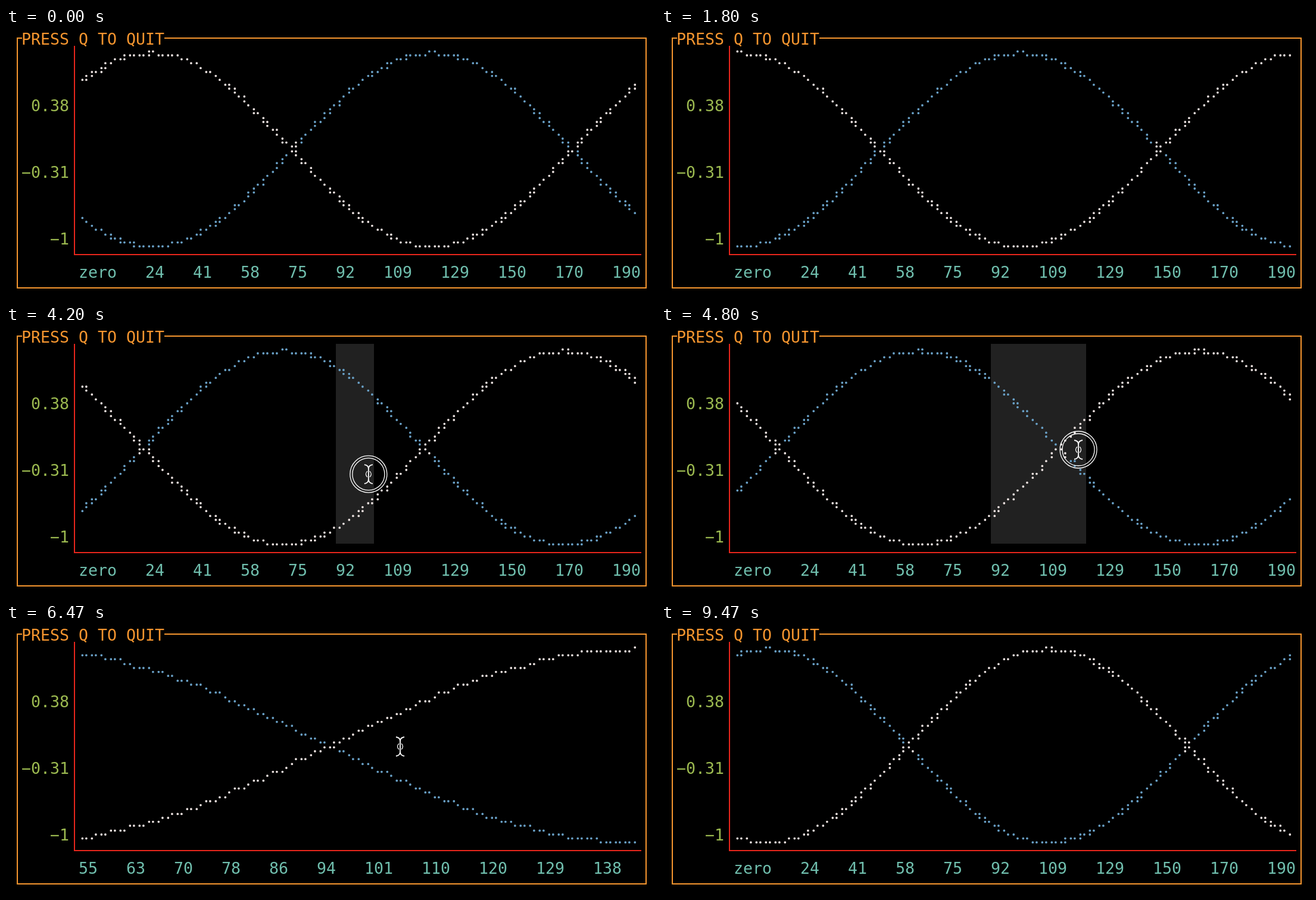
Recreate the animation shown at these times as an HTML page. Size 1090 px wide and 454 px high, loop 9.54 s.

```html
<!DOCTYPE html>
<html lang="en">
<head>
<meta charset="utf-8">
<title>Line chart</title>
<style>
html, body { margin: 0; width: 100%; height: 100%; overflow: hidden; background: #000; }
svg { display: block; width: 1090px; height: 454px; }
text { font: 26.58px "DejaVu Sans Mono", monospace; white-space: pre; }
path, circle { fill: none; }
.dots { stroke-width: 3.8; stroke-linecap: round; }
</style>
</head>
<body>
<svg viewBox="0 0 1090 454">
  <rect width="1090" height="454"/>
  <path d="M27 17H19V437H1075V17H266" stroke="#f7962f" stroke-width="2"/>
  <text x="26" y="28" fill="#f7962f">PRESS Q TO QUIT</text>
  <rect id="selection" y="30" height="336" fill="#212121"/>
  <path d="M115 30V381H1067" stroke="#e8261c" stroke-width="2"/>
  <g fill="#9cba50" text-anchor="end">
    <text x="106" y="140">0.38</text>
    <text x="106" y="252">−0.31</text>
    <text x="106" y="364">−1</text>
  </g>
  <g id="labels" fill="#70bfae"></g>
  <path id="blue" class="dots" stroke="#69a0c6"/>
  <path id="white" class="dots" stroke="#e8dfdd"/>
  <g id="cursor" stroke="#fff">
    <g id="rings" stroke-width="1.3"><circle r="31"/><circle r="27"/></g>
    <path d="M-7 -16Q0 -15 0 -9V9Q0 15 -7 16M7 -16Q0 -15 0 -9M0 9Q0 15 7 16" stroke-width="1.8"/>
    <path d="M-2 -5Q-7 0 -2 5M2 -5Q7 0 2 5" stroke-width="1.2"/>
  </g>
</svg>
<script>
const LOOP = 9540, LEFT = 122, CELL_W = 16, CELL_H = 28, CELLS = 59, ROWS = 48;
const FIRST_TICK = 25, TICK = 250, STEP = TICK / 3;
const PRESS = 3900, RELEASE = 5000;
const $ = id => document.getElementById(id);

// time, x, y of the pointer
const POINTER = [
  [2900, 590, 474], [3070, 585, 440], [3470, 565, 282], [3900, 562, 270],
  [4800, 701, 208], [5000, 703, 208], [6470, 662, 206], [7670, 648, 232],
  [7800, 650, 260], [8000, 662, 410], [8100, 668, 474]
];
// time, first and last visible value
const ZOOM = [
  [0, 0, 199], [RELEASE, 92, 124], [6130, 80, 131], [6270, 67, 138],
  [6420, 55, 145], [6600, 36, 162], [6800, 18, 180], [7000, 0, 199]
];

function pointerAt(t) {
  const n = POINTER.findIndex(p => p[0] > t);
  if (n < 1) return null;
  const [t0, x0, y0] = POINTER[n - 1], [t1, x1, y1] = POINTER[n];
  const k = (t - t0) / (t1 - t0);
  return [x0 + (x1 - x0) * k, y0 + (y1 - y0) * k];
}

// The chart redraws on a slow tick, and at once while the mouse is in use.
function shiftAt(t) {
  const busy = t > PRESS && t < RELEASE || t > 6130 && t < 7050;
  const since = t - FIRST_TICK;
  return busy
    ? 128 + Math.floor(since / STEP + 0.3)
    : 128 + 3 * Math.floor(since / TICK);
}

function plot(cells, shift, min, max, step, isWhite) {
  const col = i => Math.round((i - min) / step);
  const row = i => ROWS - 1 - Math.round((Math.sin((i + shift) * Math.PI / 100) + 1) / 0.043);
  const set = (c, r) => {
    const key = (c >> 1) + CELLS * (r >> 2);
    if (!cells.has(key)) cells.set(key, { dots: new Set() });
    const cell = cells.get(key);
    cell.white = isWhite;
    cell.dots.add((c & 1) + 2 * (r & 3));
  };
  for (let i = min + 1; i < max; i++) {
    const c0 = col(i - 1), c1 = col(i), r0 = row(i - 1), r1 = row(i);
    set(c0, r0);
    for (let c = c0 + 1; c < c1; c++) set(c, Math.round(r0 + (r1 - r0) * (c - c0) / (c1 - c0)));
    set(c1, r1);
  }
}

function drawCurves(shift, min, max, step) {
  const cells = new Map();
  plot(cells, shift, min, max, step, false);
  plot(cells, shift + 100, min, max, step, true);
  let blue = "", white = "";
  for (const [key, cell] of cells) {
    const x = LEFT + 6.3 + key % CELLS * CELL_W;
    const y = 39.4 + Math.floor(key / CELLS) * CELL_H;
    for (const dot of cell.dots) {
      const mark = `M${(x + (dot & 1) * 6.6).toFixed(1)} ${(y + (dot >> 1) * 6.6).toFixed(1)}h.01`;
      if (cell.white) white += mark; else blue += mark;
    }
  }
  $("blue").setAttribute("d", blue);
  $("white").setAttribute("d", white);
}

function drawLabels(min, step) {
  let markup = "";
  for (let cell = 0; ;) {
    const value = Math.round(min + cell * 2 * step);
    const label = value ? String(value) : "zero";
    if (cell + label.length > CELLS) break;
    markup += `<text x="${LEFT + cell * CELL_W}" y="420">${label}</text>`;
    cell += label.length + 3;
  }
  $("labels").innerHTML = markup;
}

function drawPointer(t) {
  const pos = pointerAt(t), pressed = t >= PRESS && t < RELEASE;
  $("cursor").style.display = pos ? "" : "none";
  $("rings").style.display = pressed ? "" : "none";
  if (pos) $("cursor").setAttribute("transform", `translate(${pos})`);
  const toCell = x => Math.floor((x - LEFT) / CELL_W);
  const start = 27, end = pressed ? toCell(pos[0]) + 1 : start;
  $("selection").setAttribute("x", LEFT + start * CELL_W);
  $("selection").setAttribute("width", Math.max(0, end - start) * CELL_W);
}

let lastFrame = -1, lastZoom = null;
function render(now) {
  requestAnimationFrame(render);
  const frame = Math.floor((now % LOOP + 3.4) * 0.015);
  if (frame === lastFrame) return;
  lastFrame = frame;
  const t = frame / 0.015 + 3.4;
  const zoom = ZOOM.filter(z => z[0] <= t).pop();
  const [, min, max] = zoom;
  const step = Math.round((max - min) / (CELLS * 2 - 1) * 100) / 100;
  if (zoom !== lastZoom) drawLabels(min, step);
  lastZoom = zoom;
  drawCurves(shiftAt(t), min, max, step);
  drawPointer(t);
}
render(0);
</script>
</body>
</html>
```
